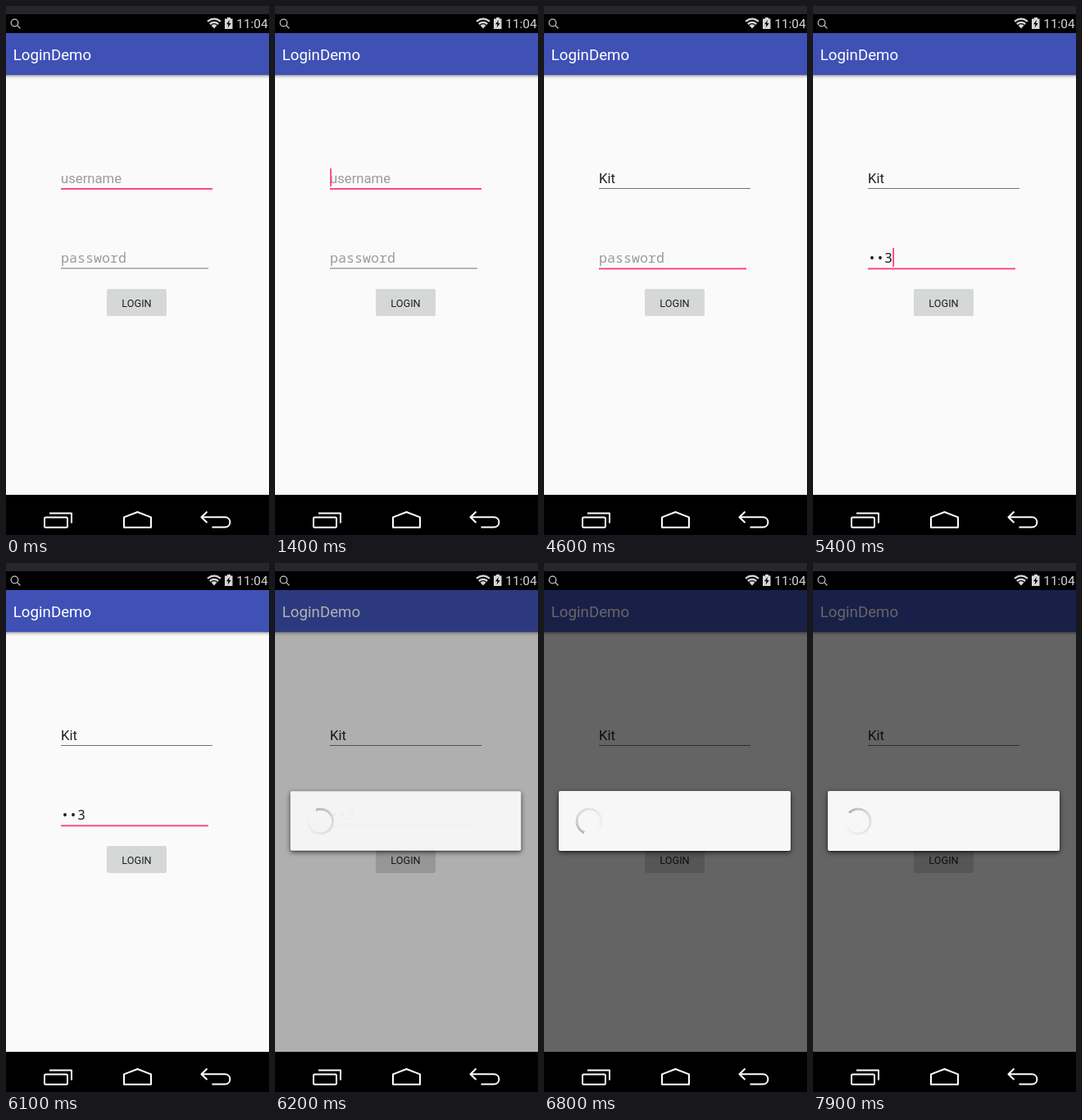
Animation, 321 px wide and 645 px high, one loop 8000 ms. Source, as an HTML page:

```html
<!DOCTYPE html>
<html lang="en">
<head>
<meta charset="utf-8">
<title>Login</title>
<style>
  html, body { margin: 0; width: 100%; height: 100%; overflow: hidden; background: #000; }
  #stage { position: absolute; left: 0; top: 0; width: 321px; height: 645px; overflow: hidden; }
  svg { position: absolute; left: 0; top: 0; display: block; }
  text { font-family: Roboto, sans-serif; white-space: pre; }
  .mono { font-family: "Noto Sans Mono", monospace; }
  .field { font-size: 16.7px; fill: #212121; }
  .hint { fill: #9b9b9b; }
  .accent { fill: #ff4081; }
  #dim { position: absolute; left: 0; top: 33px; width: 321px; height: 563px; background: #000; }
  #dialog {
    position: absolute; left: 18px; top: 278px; width: 283px; height: 73px;
    background: #f7f7f7; border-radius: 2px;
    box-shadow: 0 2px 6px rgba(0, 0, 0, .6), 0 1px 2px rgba(0, 0, 0, .4);
  }
  #spinner {
    position: absolute; left: 20px; top: 19.5px; width: 34px; height: 34px; border-radius: 50%;
    background: conic-gradient(#b6b6b6, #c4c4c4 12%, #dadada 27%, #e6e6e6 52%, #f3f3f3 78%, #f7f7f7 90%);
    -webkit-mask: radial-gradient(circle, transparent 13.2px, #000 13.8px, #000 16.2px, transparent 16.8px);
    mask: radial-gradient(circle, transparent 13.2px, #000 13.8px, #000 16.2px, transparent 16.8px);
  }
</style>
</head>
<body>
<div id="stage">
  <svg width="321" height="645" viewBox="0 0 321 645">
    <defs>
      <linearGradient id="shade" x1="0" y1="0" x2="0" y2="1">
        <stop offset="0" stop-color="#000" stop-opacity=".42"/>
        <stop offset=".4" stop-color="#000" stop-opacity=".13"/>
        <stop offset="1" stop-color="#000" stop-opacity="0"/>
      </linearGradient>
    </defs>
    <rect width="321" height="645" fill="#000"/>
    <rect width="321" height="10" fill="#26262b"/>
    <rect y="33" width="321" height="563" fill="#fafafa"/>
    <rect y="84" width="321" height="5" fill="url(#shade)"/>
    <rect y="33" width="321" height="51" fill="#3f51b5"/>
    <text x="8.8" y="66" font-size="18.7" fill="#fff">LoginDemo</text>

    <!-- status bar -->
    <g fill="none" stroke="#c8c8c8" stroke-width="1.2" stroke-linecap="round">
      <circle cx="10.5" cy="20.5" r="4.3"/>
      <path d="M13.7 23.7L17 27"/>
    </g>
    <g fill="none" stroke="#d6d6d6" stroke-width="2.3">
      <path d="M246 18.8Q254 12.4 262 18.8"/>
      <path d="M248.8 22Q254 17.8 259.2 22"/>
    </g>
    <path d="M254 27.5L250.6 23.7Q254 21 257.4 23.7Z" fill="#d6d6d6"/>
    <path d="M267 15.5H270V14H274V15.5H276.5V28H267Z" fill="#d6d6d6"/>
    <path d="M273 17L269 22.3H271.4L270.6 26.5L274.7 21H272.2Z" fill="#000"/>
    <text x="281.3" y="27" font-size="15.4" fill="#d6d6d6">11:04</text>

    <!-- form -->
    <rect id="line0" x="67"/>
    <rect id="line1" x="67"/>
    <text id="text0" class="field" x="67" y="215.7"></text>
    <text id="text1" class="field mono" x="67" y="313"></text>
    <rect id="caret0" class="accent" y="198" width="1.8" height="22"/>
    <rect id="caret1" class="accent" y="295" width="1.8" height="23"/>
    <rect x="123" y="345" width="73" height="33" rx="2" fill="#d6d7d7"/>
    <text x="159.5" y="367" font-size="12.7" fill="#212121" text-anchor="middle">LOGIN</text>

    <!-- navigation bar -->
    <g fill="none" stroke="#fff" stroke-width="2" stroke-linejoin="round">
      <rect x="47" y="623.5" width="28" height="12.3" rx="1.5"/>
      <path d="M53 618.6H80V630.5"/>
      <path d="M144 623.4L160.5 617L177 623.4V635.8H144Z"/>
      <path d="M245.5 616.5L238.5 623.3L245.5 630M238.5 623.3H267C275.5 623.3 275.5 635.5 267 635.5H251.5"/>
    </g>
  </svg>
  <div id="dim"></div>
  <div id="dialog"><div id="spinner"></div></div>
</div>
<script>
  const LOOP = 8000, STEP = 100, TURN = 1600;
  const $ = id => document.getElementById(id);

  const fields = [
    { hint: 'username', width: 185, y: 222 },
    { hint: 'password', width: 180, y: 319.4 }
  ];

  // start time, focused field, caret shown, username, password
  const steps = [
    [0, 0, 0, '', ''],
    [500, 0, 1, '', ''],
    [900, 0, 0, '', ''],
    [1200, 0, 1, '', ''],
    [1800, 0, 0, '', ''],
    [2200, 0, 1, 'K', ''],
    [2500, 0, 1, 'Ki', ''],
    [2700, 0, 1, 'Kit', ''],
    [3100, 0, 0, 'Kit', ''],
    [3600, 0, 1, 'Kit', ''],
    [4000, 0, 0, 'Kit', ''],
    [4100, 1, 1, 'Kit', ''],
    [4600, 1, 0, 'Kit', ''],
    [4800, 1, 1, 'Kit', '1'],
    [5100, 1, 1, 'Kit', '•2'],
    [5400, 1, 1, 'Kit', '••3'],
    [5900, 1, 0, 'Kit', '••3']
  ];

  // start time, backdrop darkness, dialog opacity
  const fades = [
    [0, 0, 0], [6200, .3, .96], [6300, .55, 1], [6400, .58, 1], [6500, .6, 1]
  ];

  const at = (table, t) => table.filter(row => row[0] <= t).pop();

  function set(el, attrs) {
    for (const name in attrs) el.setAttribute(name, attrs[name]);
  }

  function drawField(i, value, focused, caret) {
    const { hint, width, y } = fields[i];
    const text = $('text' + i);
    text.textContent = value || hint;
    text.classList.toggle('hint', !value);
    const end = value ? text.getComputedTextLength() : 0;
    set($('caret' + i), { x: 67.2 + end, visibility: focused && caret ? 'visible' : 'hidden' });
    set($('line' + i), {
      y, width,
      height: focused ? 1.9 : 1,
      fill: focused ? '#ff4081' : '#727272'
    });
  }

  function draw(time) {
    const t = Math.floor(time % LOOP / STEP) * STEP;
    const [, focus, caret, ...values] = at(steps, t);
    values.forEach((value, i) => drawField(i, value, focus === i, caret));

    const [, dark, shown] = at(fades, t);
    $('dim').style.opacity = dark;
    $('dialog').style.opacity = shown;
    $('dialog').style.transform = shown < 1 ? 'scale(.995)' : 'none';
    $('spinner').style.transform = `rotate(${-45 - (t - 6300) / TURN * 360}deg)`;
  }

  const start = performance.now();
  function tick() {
    draw(performance.now() - start);
    requestAnimationFrame(tick);
  }
  tick();
</script>
</body>
</html>
```
